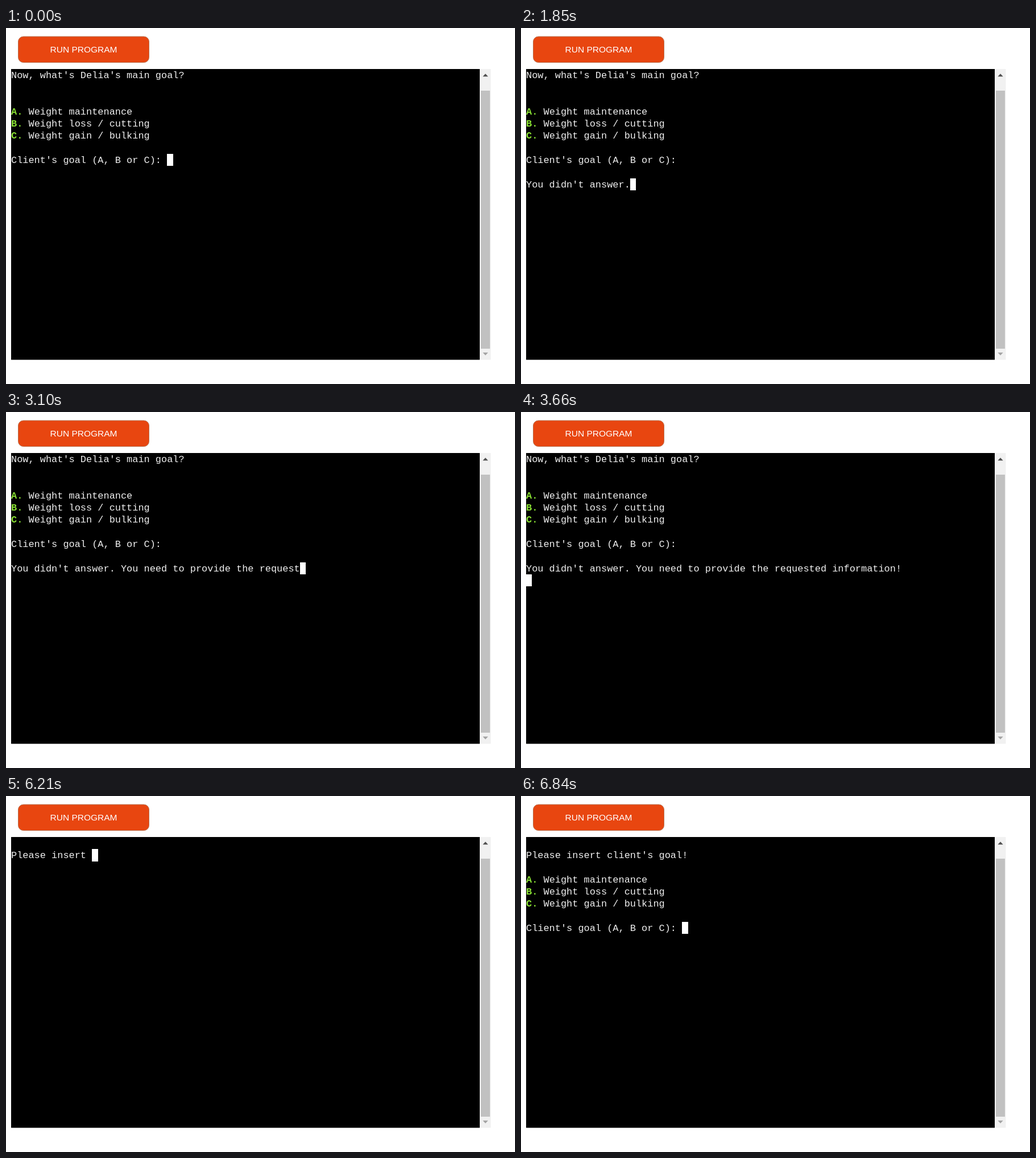
Write an HTML page with a canvas that moves like this. It is 895 by 625 pixels and loops after 8 s.

```html
<!DOCTYPE html>
<html lang="en">
<head>
<meta charset="utf-8">
<title>Terminal</title>
<style>
  html, body { margin: 0; width: 100%; height: 100%; overflow: hidden; background: #fff; }
  canvas { display: block; }
</style>
</head>
<body>
<canvas id="stage" width="895" height="625"></canvas>
<script>
const ctx = document.getElementById('stage').getContext('2d');
const LOOP = 8000;
const CHAR_MS = 38;
const LEFT = 9, TOP = 72, COL = 10.16, ROW = 21.28;
const MONO = '16.93px "Liberation Mono", "Courier New", monospace';

const QUESTION = "Now, what's Delia's main goal?";
const OPTIONS = ['Weight maintenance', 'Weight loss / cutting', 'Weight gain / bulking'];
const PROMPT = "Client's goal (A, B or C): ";
const WARNING = "You didn't answer. You need to provide the requested information!";
const RETRY = "Please insert client's goal!";

// The screen refreshes in evenly spaced steps between these [time, steps since previous] anchors.
const ANCHORS = [
  [0, 0], [910, 1], [1140, 1], [1850, 9], [1940, 1], [2010, 1], [2480, 6], [2570, 1],
  [2790, 3], [2880, 1], [3660, 10], [5650, 1], [6210, 7], [6440, 3], [6840, 5]
];
const refreshes = [0];
for (let i = 1; i < ANCHORS.length; i++) {
  const from = ANCHORS[i - 1][0], [to, steps] = ANCHORS[i];
  for (let k = 1; k <= steps; k++) {
    refreshes.push(Math.round((from + (to - from) * k / steps) / 10) * 10);
  }
}

function lastRefresh(time) {
  let shown = 0;
  for (const r of refreshes) if (r <= time) shown = r;
  return shown;
}

function rect(x, y, w, h, color) {
  ctx.fillStyle = color;
  ctx.fillRect(x, y, w, h);
}

function print(row, text, col = 0, color = '#f0f0f0', weight = '') {
  ctx.font = weight + MONO;
  ctx.fillStyle = color;
  ctx.fillText(text, LEFT + col * COL, TOP + row * ROW + 16);
}

function cursor(row, col) {
  const x = Math.round(LEFT + col * COL), y = Math.round(TOP + row * ROW);
  const right = Math.round(LEFT + (col + 1) * COL + 0.1);
  rect(x, y, right - x, Math.round(TOP + (row + 1) * ROW) - y, '#fff');
}

// Types a line and moves the cursor to the next row once the newline is reached.
function typeLine(row, text, elapsed) {
  const count = Math.max(0, Math.floor(elapsed / CHAR_MS));
  print(row, text.slice(0, count));
  if (count > text.length) cursor(row + 1, 0);
  else cursor(row, count);
}

function menu() {
  OPTIONS.forEach((option, i) => {
    print(3 + i, 'ABC'[i] + '.', 0, '#8ae234', 'bold ');
    print(3 + i, option, 3);
  });
  print(7, PROMPT);
}

function arrow(y, height, color) {
  ctx.fillStyle = color;
  ctx.beginPath();
  ctx.moveTo(838.3, y);
  ctx.lineTo(847.7, y);
  ctx.lineTo(843, y + height);
  ctx.fill();
}

function chrome() {
  rect(0, 0, 895, 625, '#fff');

  ctx.beginPath();
  ctx.roundRect(21.5, 15, 230, 45.5, 9);
  ctx.fillStyle = '#e84610';
  ctx.fill();
  ctx.strokeStyle = '#b9704f';
  ctx.lineWidth = 1;
  ctx.stroke();
  ctx.font = '15.5px "Liberation Sans", Arial, sans-serif';
  ctx.fillStyle = '#fff';
  ctx.textAlign = 'center';
  ctx.fillText('RUN PROGRAM', 136.5, 42.5);
  ctx.textAlign = 'left';

  rect(LEFT, TOP, 824, 510.5, '#000');
  rect(833, TOP, 19.5, 510.5, '#f1f1f1');
  rect(835, 110, 16, 453, '#c1c1c1');
  arrow(85.3, -5, '#505050');
  arrow(569.8, 5, '#a3a3a3');
}

function draw(time) {
  const t = lastRefresh(time);
  chrome();
  if (t < 5650) {
    print(0, QUESTION);
    menu();
    if (t < 910) cursor(7, PROMPT.length);
    else if (t < 1140) cursor(8, 0);
    else typeLine(9, WARNING, t - 1135);
  } else if (t < 6840) {
    typeLine(1, RETRY, t - 5650);
  } else {
    print(1, RETRY);
    menu();
    cursor(7, PROMPT.length);
  }
}

let start;
function tick(now) {
  start ??= now;
  draw((now - start) % LOOP);
  requestAnimationFrame(tick);
}
draw(0);
requestAnimationFrame(tick);
</script>
</body>
</html>
```
